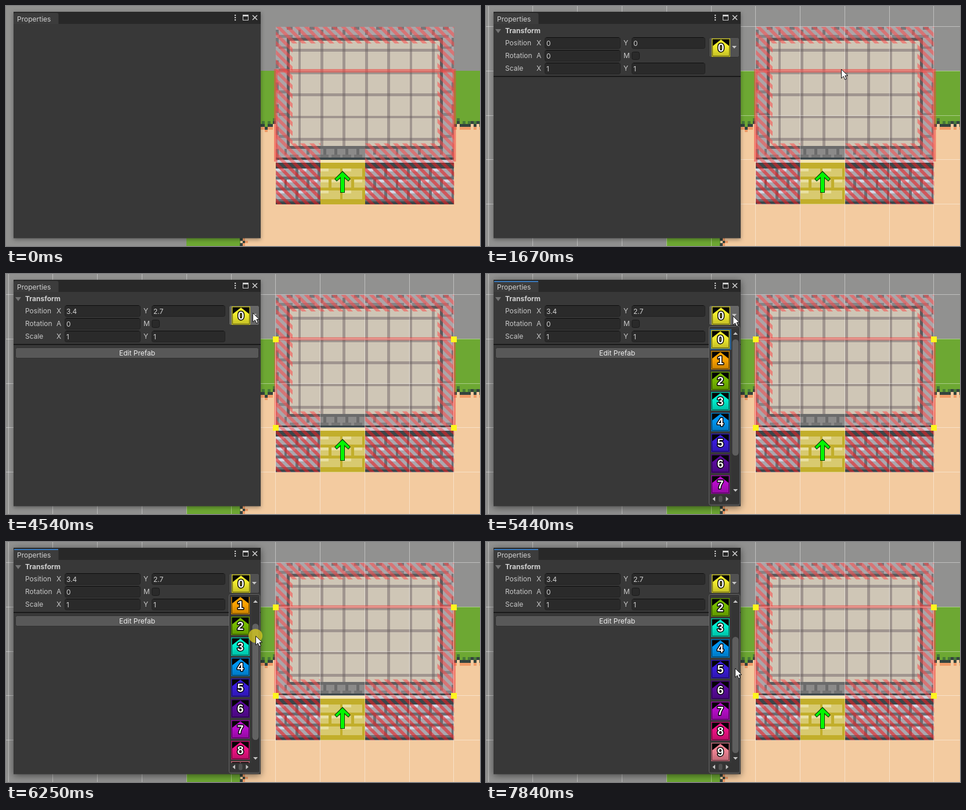
An HTML page with a canvas for the animation above (8 s loop, 817 by 415 pixels).

```html
<!DOCTYPE html>
<html lang="en">
<head>
<meta charset="utf-8">
<title>Prefab properties</title>
<style>
html, body { margin: 0; width: 100%; height: 100%; overflow: hidden; background: #919190; }
canvas { display: block; }
</style>
</head>
<body>
<canvas id="stage" width="817" height="415"></canvas>
<script>
const W = 817, H = 415, LOOP = 8000;
const ctx = document.getElementById('stage').getContext('2d');
const CELL = 76.8, PX = 4.8, OX = 465.2, OY = 36;
const FONT = 'Inter, Roboto, sans-serif';
const ICONS = ['#f4ee2e', '#ffa400', '#78bc00', '#00f0d0', '#0096f2',
               '#3a1cdc', '#5a0a9c', '#b80cca', '#f01284', '#f08494'];

const SELECT = 1650, PLACE = 2360, HANDLES = 2420, OPEN = 5130;
const GRAB = 5890, RELEASE = 6880, GRAB_Y = 134, SCROLL_MAX = 72, THUMB_RATIO = 0.71;
const PRESSES = [[1500, SELECT], [5040, 5170], [GRAB, RELEASE]];

// Cursor keys: time, x, y, easing into the key
const smooth = u => u * u * (3 - 2 * u);
const out = u => 1 - (1 - u) ** 2;
const linear = u => u;
const hold = u => u < 1 ? 0 : 1;
const PATH = [
  [180, 764, 412], [960, 618, 116, out], [1300, 612, 109, linear],
  [PLACE, 610, 109, hold], [3360, 610, 109, hold], [4160, 427, 67, smooth],
  [4230, 424, 67, hold], [4510, 425, 67, hold], [5350, 425, 67, hold],
  [5880, 428, 134, smooth], [6010, 428, 138, linear], [6250, 430, 162, linear],
  [6720, 432, 220, out], [7550, 430, 219, hold], [7840, 429, 218, hold], [LOOP, 429, 218, hold]
];

function cursorAt(t) {
  const i = Math.max(1, PATH.findIndex(k => k[0] > t));
  const [t0, x0, y0] = PATH[i - 1], [t1, x1, y1, ease] = PATH[i];
  const u = ease((t - t0) / (t1 - t0));
  return { x: x0 + (x1 - x0) * u, y: y0 + (y1 - y0) * u };
}

function rect(x, y, w, h, color) {
  ctx.fillStyle = color;
  ctx.fillRect(x, y, w, h);
}

function round(x, y, w, h, r, fill, line) {
  ctx.beginPath();
  ctx.roundRect(x, y, w, h, r);
  ctx.fillStyle = fill;
  ctx.fill();
  if (line) {
    ctx.strokeStyle = line;
    ctx.lineWidth = 1;
    ctx.stroke();
  }
}

function poly(points, fill) {
  ctx.beginPath();
  points.forEach(([x, y]) => ctx.lineTo(x, y));
  ctx.closePath();
  ctx.fillStyle = fill;
  ctx.fill();
}

function text(s, x, y, color = '#c8c8c8', weight = 400, align = 'left') {
  ctx.font = `${weight} 12px ${FONT}`;
  ctx.textAlign = align;
  ctx.fillStyle = color;
  ctx.fillText(s, x, y);
}

// Art pixels counted from the house's top left corner
function tile(x, y, w, h, color) {
  const l = Math.round(OX + x * PX), t = Math.round(OY + y * PX);
  rect(l, t, Math.round(OX + (x + w) * PX) - l, Math.round(OY + (y + h) * PX) - t, color);
}

function ground() {
  rect(0, 0, W, H, '#919190');
  rect(388, 112, 429, 303, '#f3cba0');
  rect(388, 112, 429, 92, '#6da833');
  rect(311, 342, 93, 73, '#6da833');
  // Depth of the ragged grass edge, repeated every cell
  const edge = [3, 2, 3, 3, 3, 3, 2, 3, 2, 3, 3, 3, 4, 3, 3, 2];
  for (let x = -6; x < 74; x++) {
    const d = edge[(x + 64) % 16], y = 32 + d;
    if (d === 4) tile(x, 35, 1, 1, '#6da833');
    if (x % 2) tile(x, y - 1, 1, 1, '#477a38');
    tile(x, y, 1, 1, '#34443e');
    if (d > 2) tile(x, y + 1, 1, 1, '#f09c68');
  }
  for (let y = 76; y < 79; y++) {
    const s = y % 2;
    tile(-13 + s, y, 1, 1, '#34443e');
    tile(-12 + s, y, 1, 1, '#f09c68');
  }
}

function bricks(x0, x1, top, mortar, base, light) {
  tile(x0, 49, x1 - x0, 15, top);
  tile(x0, 51, x1 - x0, 12, mortar);
  for (let r = 0; r < 6; r++) {
    const y = 51 + r * 2;
    for (let x = x0 - 8 + (r >> 1) % 2 * 4; x < x1; x += 8) {
      const l = Math.max(x0, x), e = Math.min(x1, x + 7);
      if (e <= l) continue;
      tile(l, y, e - l, r % 2 ? 1 : 2, base);
      if (r % 2 === 0) tile(l, y, Math.min(3, e - l), 1, light);
    }
  }
}

function house() {
  tile(0, 0, 64, 48, '#aaa6a9');
  // Notches in the wall tops
  for (let i = 0; i < 64; i += 8) {
    tile(i + 4, 0, 2, 1, '#77777a');
    tile(i, 1, 1, 2, '#77777a');
    tile(i + 1, 3, 5, 1, '#858386');
    tile(i + 3, 44, 1, 2, '#77777a');
    tile(i + 5, 46, 3, 1, '#858386');
    if (i > 40) continue;
    tile(0, i + 4, 1, 3, '#77777a');
    tile(1, i + 7, 3, 1, '#858386');
    tile(63, i + 4, 1, 3, '#77777a');
    tile(60, i + 7, 3, 1, '#858386');
  }
  tile(4, 4, 56, 40, '#5d5a5c');
  tile(5, 5, 54, 38, '#cfc6b6');
  for (let k = 8; k < 64; k += 8) tile(k, 5, 1, 38, '#a0958f');
  for (let k = 8; k < 48; k += 8) {
    tile(5, k, 54, 1, '#a0958f');
    for (let x = 8; x < 64; x += 8) tile(x, k, 1, 1, '#857b78');
  }
  tile(16, 43, 16, 4, '#8b8a89');
  tile(16, 43, 16, 1, '#6b6b6b');
  for (let x = 16; x < 32; x += 4) {
    tile(x + 1, 44, 1, 2, '#6b6b6b');
    tile(x, 46, 3, 1, '#747474');
  }
  tile(0, 47, 64, 1, '#3c474a');
  tile(0, 48, 64, 1, '#c9ccd6');
  bricks(0, 64, '#3c474a', '#6a6e74', '#a9a8af', '#cfd7e4');
  tile(16, 48, 16, 1, '#f4e6b4');
  bricks(16, 32, '#c2ae2b', '#c2ae2b', '#d8ca70', '#e8dfa0');
}

function stripes(top, bottom, color, areas) {
  ctx.save();
  ctx.beginPath();
  areas.forEach(([x, y, w, h]) => ctx.rect(OX + x * PX, OY + y * PX, w * PX, h * PX));
  ctx.clip();
  const h = bottom - top;
  for (let x = OX - 384; x < OX + 320; x += 16) {
    const s = x + top - OY;
    poly([[s, top], [s + 8, top], [s + 8 + h, bottom], [s + h, bottom]], color);
  }
  ctx.restore();
}

function obstacles() {
  stripes(36, 271, 'rgba(255,72,72,.53)', [
    [0, 0, 64, 6], [0, 6, 6, 36], [58, 6, 6, 36], [0, 42, 16, 7], [32, 42, 32, 7]]);
  stripes(271, 343.2, 'rgba(235,30,34,.58)', [[0, 49, 16, 15], [32, 49, 32, 15]]);
}

function arrow() {
  poly([[580, 285], [594, 299], [590, 303.5], [584, 298], [584, 323], [576, 323],
        [576, 298], [570, 303.5], [566, 299]], '#083c08');
  poly([[580, 287], [592.5, 299], [590, 302], [583, 295.5], [583, 322], [577, 322],
        [577, 295.5], [570, 302], [567.5, 299]], '#00f800');
}

function grid() {
  const color = 'rgba(255,255,255,.42)';
  for (let x = 4; x < W; x += CELL) rect(Math.floor(x), 0, 1, H, color);
  for (let y = 35; y < H; y += CELL) rect(0, Math.round(y), W, 1, color);
}

function zone(t) {
  const placed = t >= HANDLES;
  ctx.lineJoin = 'miter';
  ctx.beginPath();
  [[465, 269], [465, 112], [772.5, 112], [772.5, 269]].forEach(([x, y]) => ctx.lineTo(x, y));
  ctx.strokeStyle = 'rgba(240,70,66,.55)';
  ctx.lineWidth = placed ? 5 : 6;
  ctx.stroke();
  if (!placed) return;
  ctx.strokeStyle = 'rgba(255,240,235,.5)';
  ctx.lineWidth = 1;
  ctx.strokeRect(464.5, 112.5, 307, 153);
  for (const x of [460, 767]) for (const y of [108, 261]) rect(x, y, 10, 10, '#fff51e');
}

function icon(n, cx, cy) {
  const c = ICONS[n], l = cx - 16, t = cy - 16;
  rect(l, t, 32, 32, c);
  rect(l, t, 32, 32, 'rgba(0,0,0,.22)');
  rect(l + 1.5, t + 1.5, 29, 29, '#050505');
  poly([[cx, t + 2], [l + 30, t + 13], [l + 30, t + 30], [l + 2, t + 30], [l + 2, t + 13]], c);
  const g = ctx.createLinearGradient(0, t + 13, 0, t + 31);
  g.addColorStop(0, 'rgba(0,0,0,0)');
  g.addColorStop(1, 'rgba(0,0,0,.2)');
  rect(l + 2, t + 13, 28, 17, g);
  ctx.font = '700 20px "Liberation Sans", sans-serif';
  ctx.textAlign = 'center';
  ctx.lineJoin = 'round';
  ctx.lineWidth = 3;
  ctx.strokeStyle = '#000';
  ctx.strokeText(n, cx, cy + 7);
  ctx.fillStyle = '#fff';
  ctx.fillText(n, cx, cy + 7);
}

function field(x, y, w, value) {
  round(x + .5, y + .5, w - 1, 19, 3, '#2a2a2a', '#212121');
  rect(x + 3, y, w - 6, 1, '#0d0d0d');
  text(value, x + 3, y + 15, '#d2d2d2');
}

function frame(t) {
  const focused = t >= OPEN;
  ctx.save();
  ctx.shadowColor = focused ? 'rgba(0,0,0,.5)' : 'rgba(0,0,0,.35)';
  ctx.shadowBlur = focused ? 12 : 7;
  ctx.shadowOffsetY = 2;
  rect(13, 10, 426, 391.5, '#383838');
  ctx.restore();
  rect(13, 10, 426, 21, '#282828');
  round(13, 12, 77.5, 19, [3, 3, 0, 0], '#3c3c3c');
  if (focused) rect(14, 12, 76, 2, '#3a79bb');
  text('Properties', 19, 27, '#d2d2d2');
  for (const y of [15, 19, 23]) rect(394, y, 2.2, 2.2, '#d0d0d0');
  ctx.strokeStyle = '#d0d0d0';
  ctx.lineWidth = 1;
  ctx.strokeRect(408.5, 15.5, 9, 9);
  rect(408, 15, 10, 3, '#d0d0d0');
  ctx.lineWidth = 1.6;
  ctx.beginPath();
  ctx.moveTo(425, 16); ctx.lineTo(433, 24);
  ctx.moveTo(433, 16); ctx.lineTo(425, 24);
  ctx.stroke();
}

function properties(t) {
  const placed = t >= PLACE;
  poly([[16, 40], [26, 40], [21, 47]], '#737373');
  text('Transform', 33, 47, '#d2d2d2', 700);
  text('Position', 33, 68);
  text('Rotation', 33, 90);
  text('Scale', 33, 112);
  [['X', 87, 68], ['Y', 237, 68], ['A', 87, 90], ['M', 237, 90], ['X', 87, 112], ['Y', 237, 112]]
    .forEach(([s, x, y]) => text(s, x, y));
  field(101, 54, 131, placed ? '3.4' : '0');
  field(251, 54, 127, placed ? '2.7' : '0');
  field(101, 76, 131, '0');
  round(251.5, 79.5, 13, 13, 3, '#2a2a2a', '#191919');
  field(101, 98, 131, '1');
  field(251, 98, 127, '1');
  rect(13, 121, 426, 1.5, '#111');
  if (placed) {
    round(16.5, 127.5, 419, 18, 3, '#585858', '#303030');
    text('Edit Prefab', 226, 141, '#eee', 400, 'center');
  }
  const hover = t > 4130 && t < 5550;
  round(384.5, 54.5, 52, 34, 3, hover ? '#676767' : '#515151', '#303030');
  icon(0, 405, 72);
  poly([[424, 69], [432, 69], [428, 73.5]], '#c8c8c8');
}

function dropdown(t, scroll) {
  round(384.5, 90.5, 53, 309, 3, '#383838', '#686868');
  ctx.save();
  ctx.beginPath();
  ctx.rect(386, 95, 37, 287);
  ctx.clip();
  ICONS.forEach((_, n) => {
    const y = Math.round(113 + n * 35.8 - scroll);
    if (n === 0) rect(386, y - 18, 37, 36, '#2c5d87');
    icon(n, 404, y);
  });
  ctx.restore();
  rect(423, 95, 14, 287, '#343434');
  poly([[426, 105], [434, 105], [430, 100.5]], '#c4c4c4');
  poly([[426, 372], [434, 372], [430, 376.5]], '#c4c4c4');
  const held = t >= GRAB && t < RELEASE;
  round(424.5, 113 + scroll * THUMB_RATIO, 11, 201, 5.5, held ? '#626262' : '#5e5e5e');
  rect(386, 382, 51, 14, '#343434');
  poly([[395, 385], [395, 393], [390.5, 389]], '#c4c4c4');
  poly([[413.5, 385], [413.5, 393], [418, 389]], '#c4c4c4');
  round(401, 383.5, 6.5, 11, 3.2, '#505050');
}

function pointer(t, { x, y }) {
  if (PRESSES.some(([a, b]) => t >= a && t < b)) {
    ctx.beginPath();
    ctx.arc(x, y, 12, 0, 7);
    ctx.fillStyle = 'rgba(216,202,30,.76)';
    ctx.fill();
  }
  ctx.beginPath();
  [[.5, .5], [.5, 16], [4.2, 12.6], [6.7, 18.3], [9.3, 17.1], [6.9, 11.6], [11.6, 11.4]]
    .forEach(([dx, dy]) => ctx.lineTo(x + dx, y + dy));
  ctx.closePath();
  ctx.fillStyle = '#fff';
  ctx.fill();
  ctx.strokeStyle = '#111';
  ctx.lineWidth = 1;
  ctx.lineJoin = 'miter';
  ctx.stroke();
}

function draw(t) {
  const cursor = cursorAt(t);
  ground();
  house();
  obstacles();
  arrow();
  if (t >= SELECT) grid();
  zone(t);
  frame(t);
  if (t >= SELECT) properties(t);
  if (t >= OPEN) {
    const drag = t < GRAB ? 0 : (cursor.y - GRAB_Y) / THUMB_RATIO;
    dropdown(t, Math.min(SCROLL_MAX, Math.max(0, drag)));
  }
  if (t >= 180) pointer(t, cursor);
}

const start = performance.now();
function tick() {
  draw((performance.now() - start) % LOOP);
  requestAnimationFrame(tick);
}
tick();
</script>
</body>
</html>
```
